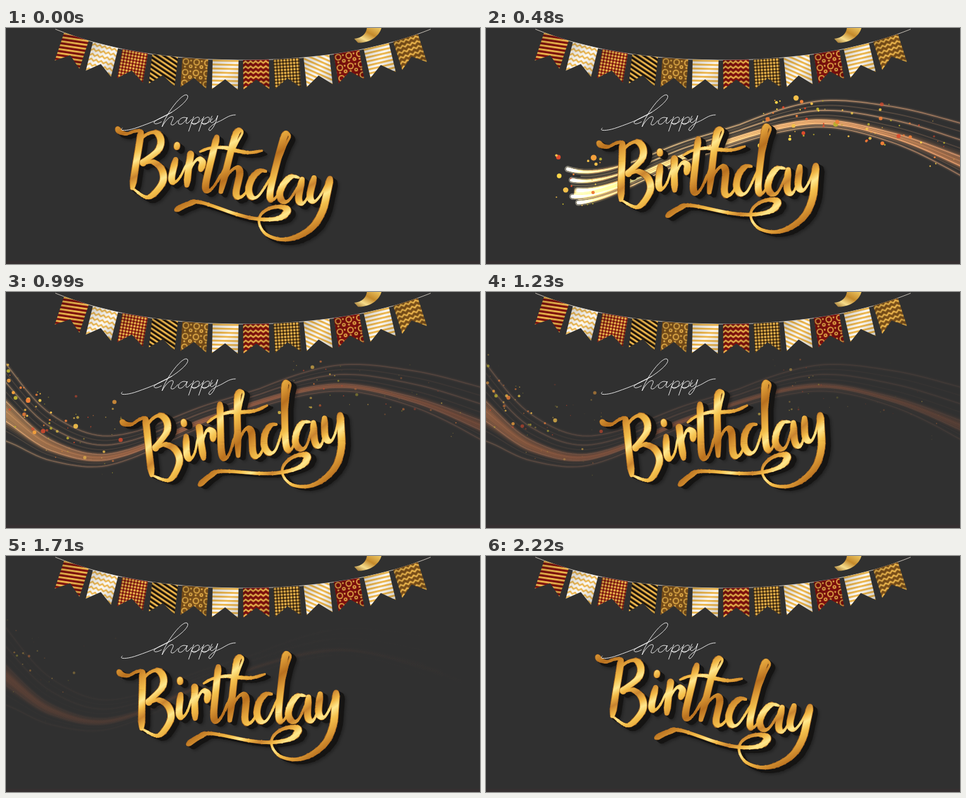
An HTML page with a canvas that plays this animation: 750x375 px, repeating every 2.25 s.

```html
<!DOCTYPE html>
<html lang="en">
<head>
<meta charset="utf-8">
<title>Happy Birthday</title>
<style>
html, body { margin: 0; width: 100%; height: 100%; overflow: hidden; background: #303030; }
canvas, svg { position: absolute; left: 0; top: 0; width: 750px; height: 375px; display: block; }
</style>
</head>
<body>
<canvas id="light" width="750" height="375"></canvas>
<svg viewBox="0 0 750 375">
  <defs id="defs">
    <linearGradient id="gold" gradientUnits="userSpaceOnUse" x1="200" y1="160" x2="232" y2="222" spreadMethod="reflect">
      <stop offset="0" stop-color="#b8701f"/><stop offset=".25" stop-color="#dc9a36"/>
      <stop offset=".5" stop-color="#f4c04c"/><stop offset=".68" stop-color="#ffe88e"/>
      <stop offset=".82" stop-color="#f2b846"/><stop offset="1" stop-color="#c98430"/>
    </linearGradient>
    <linearGradient id="curl" x1="0" y1="1" x2="1" y2="0">
      <stop offset="0" stop-color="#8d5f1c"/><stop offset=".3" stop-color="#f7dd8c"/>
      <stop offset=".6" stop-color="#c48a2c"/><stop offset="1" stop-color="#f0c963"/>
    </linearGradient>
    <linearGradient id="sheen" x1="0" y1="0" x2="1" y2="1">
      <stop offset="0" stop-color="#000" stop-opacity=".18"/><stop offset=".5" stop-color="#000" stop-opacity="0"/>
      <stop offset="1" stop-color="#000" stop-opacity=".18"/>
    </linearGradient>
    <filter id="soft" x="-10%" y="-10%" width="120%" height="120%"><feGaussianBlur stdDeviation="2"/></filter>
  </defs>
  <rect y="370" width="750" height="5" fill="#352f30"/>
  <path id="string" fill="none" stroke="#c9c3ba"/>
  <g id="flags"></g>
  <path d="M571 0H594C591 12 577 24 557 23.5L551 17C563 16 570 9 571 0Z" fill="url(#curl)"/>
  <g id="word"></g>
  <g fill="none" stroke="#fff" stroke-width=".9" stroke-linecap="round">
    <path d="M184 159C177 164 192 164 208 158C228 151 248 143 262 134C276 125 291 112 287 107C282 102 266 121 258 134C252 144 248 152 247 157C252 147 260 139 264 141C267 144 258 153 262 154C266 155 269 150 272 147"/>
    <path d="M262 134C249 141 238 145 234 150C235 154 241 152 246 149"/>
    <path d="M286 143C279 139 271 147 273 152C277 156 284 148 287 142C284 150 284 153 288 151L294 145"/>
    <path id="p" d="M297 141L289 164M293 151C298 141 307 139 306 145C304 152 297 156 294 151C301 154 307 149 311 144"/>
    <use href="#p" x="16"/>
    <path d="M326 140C322 147 323 152 327 150C331 148 334 143 335 139C333 148 329 159 323 163C317 163 324 154 336 149C346 145 352 138 363 138"/>
  </g>
</svg>
<script>
const $ = id => document.getElementById(id);
const clamp = (v, a = 0, b = 1) => Math.min(b, Math.max(a, v));

// Flags hang along one sagging curve
const GOLD = '#edb64c', RED = '#7d0f0d', WHITE = '#fbf8f2', BRONZE = '#7a4f1a';
const sag = x => 51 - .00043 * (x - 375) ** 2 - 1.45e-9 * (x - 375) ** 4;
const tilt = x => Math.atan(sag(x + .5) - sag(x - .5));

const motifs = {
  bars: c => [6.4, `<rect width="7" height="3" fill="${c}"/>`],
  zigzag: c => [8, `<path d="M-1 6L4 2L9 6" fill="none" stroke="${c}" stroke-width="2.4"/>`],
  dots: c => [5, `<circle cx="2.5" cy="2.5" r="1.9" fill="${c}"/>`],
  rings: c => [17, `<g fill="none" stroke="${c}" stroke-width="1.7"><circle cx="6" cy="6" r="4.3"/><circle cx="14" cy="13" r="2"/></g>
    <circle cx="14" cy="4" r="1.4" fill="${c}"/><circle cx="5" cy="14" r="1.6" fill="${c}"/>`]
};
const flags = [
  ['bars', RED, -10], ['zigzag', WHITE], ['dots', RED], ['bars', '#1f150b', 27],
  ['rings', BRONZE], ['bars', WHITE], ['zigzag', RED], ['dots', '#3a260f'],
  ['bars', WHITE, 30], ['rings', RED], ['bars', WHITE], ['zigzag', BRONZE]
];
let hang = 92;
flags.forEach(([motif, ground, turn = 0], i) => {
  const [size, art] = motifs[motif](GOLD);
  $('defs').insertAdjacentHTML('beforeend',
    `<pattern id="cloth${i}" width="${size}" height="${size}" patternUnits="userSpaceOnUse" patternTransform="rotate(${turn})">` +
    `<rect width="${size}" height="${size}" fill="${ground}"/>${art}</pattern>`);
  const a = tilt(hang + 20), d = 'M0 0H41V47L20.5 31L0 47Z';
  $('flags').insertAdjacentHTML('beforeend',
    `<g transform="translate(${hang} ${sag(hang)}) rotate(${a * 180 / Math.PI})">` +
    `<path d="${d}" fill="url(#cloth${i})"/><path d="${d}" fill="url(#sheen)"/></g>`);
  hang += 48 * Math.cos(a);
});
let cord = '';
for (let x = 78; x <= 672; x += 6) cord += `${cord ? 'L' : 'M'}${x} ${sag(x).toFixed(1)}`;
$('string').setAttribute('d', cord);

// Lettering: a pen that presses on downstrokes and lifts on upstrokes
const num = v => v.toFixed(1);
function segment(a, b, k) {
  const dx = b.x - a.x, dy = b.y - a.y, len = Math.hypot(dx, dy) || 1;
  const nx = -dy / len, ny = dx / len, p = a.w * k / 2, q = b.w * k / 2;
  const at = (c, s) => `${num(c.x + nx * s)} ${num(c.y + ny * s)}`;
  return `M${at(a, p)}L${at(b, q)}L${at(b, -q)}L${at(a, -p)}Z` +
    `M${num(b.x - q)} ${num(b.y)}a${num(q)} ${num(q)} 0 1 0 ${num(2 * q)} 0a${num(q)} ${num(q)} 0 1 0 ${num(-2 * q)} 0Z`;
}
let full = '', face = '';
function brush(text, weight = 1) {
  const pts = text.split(', ').map(s => s.split(' ').map(Number)), n = pts.length - 1;
  const pt = i => pts[clamp(i, 0, n)];
  const curve = s => {
    const i = Math.min(n - 1, Math.floor(s)), u = s - i;
    return [0, 1].map(j => {
      const a = pt(i - 1)[j], b = pt(i)[j], c = pt(i + 1)[j], d = pt(i + 2)[j];
      return b + u / 2 * (c - a + u * (2 * a - 5 * b + 4 * c - d + u * (3 * (b - c) + d - a)));
    });
  };
  let last;
  for (let s = 0; s <= n; s += 1 / 8) {
    const [x, y] = curve(s), [x0, y0] = curve(Math.max(0, s - .15)), [x1, y1] = curve(Math.min(n, s + .15));
    const fall = (y1 - y0) / (Math.hypot(x1 - x0, y1 - y0) || 1);
    const taper = Math.min(1, .65 + s, .65 + n - s);
    const next = { x, y, w: (5.8 + fall * (fall > 0 ? 6 : 2)) * weight * taper };
    if (last) {
      full += segment(last, next, 1);
      face += segment(last, next, .86);
    }
    last = next;
  }
}
// B
brush('176 160, 181 165, 191 168, 203 164, 214 163', .9);
brush('214 164, 210 190, 205 220, 200 254');
brush('206 186, 221 170, 237 166, 245 178, 240 195, 217 214, 233 213, 247 226, 247 247, 225 269, 202 256', 1.05);
// i
brush('271 185, 270 190', .9);
brush('269 207, 262 238, 267 245, 276 236, 285 217');
// r
brush('285 217, 292 200, 289 222, 286 250');
brush('287 238, 295 218, 304 208, 311 213, 308 225');
// t
brush('334 172, 327 200, 316 248, 320 259, 330 250, 340 232');
brush('306 197, 322 191, 345 190, 365 195, 385 198, 405 195', .9);
// h
brush('335 245, 352 210, 366 182, 374 166, 368 163, 360 180, 340 260');
brush('342 252, 352 232, 364 222, 370 230, 364 262, 370 269, 379 262, 388 245');
// d
brush('412 228, 402 227, 390 238, 384 256, 389 269, 401 265, 422 232');
brush('418 240, 432 212, 442 187, 449 172, 443 168, 436 186, 418 260, 424 272, 440 250');
// a
brush('464 238, 452 236, 440 247, 433 264, 439 276, 450 271, 469 240');
brush('469 238, 463 270, 469 279, 478 268, 485 250');
// y and its flourish
brush('488 236, 481 266, 487 276, 498 265, 512 238');
brush('513 238, 508 262, 501 290, 486 315, 462 331, 436 336, 412 328, 401 312, 403 297, 416 287, 433 284, 445 289, 437 300, 420 304, 395 303, 365 296, 308 277, 288 280, 269 289', 1.1);

const depth = [2, 4, 6, 7].map(o => `<path d="${full}" transform="translate(${o} ${o * .8})"/>`).join('');
$('word').innerHTML =
  `<path d="${full}" transform="translate(9 8)" fill="#000" opacity=".3" filter="url(#soft)"/>` +
  `<g fill="#151413">${depth}</g><path d="${full}" fill="#a8661f"/><path d="${face}" fill="url(#gold)"/>`;

// Light trail
const ctx = $('light').getContext('2d');
function spline(...keys) {
  const slope = i => {
    const a = keys[Math.max(0, i - 1)], b = keys[Math.min(keys.length - 1, i + 1)];
    return (b[1] - a[1]) / (b[0] - a[0]);
  };
  return x => {
    let i = 0;
    while (i < keys.length - 2 && x > keys[i + 1][0]) i++;
    const [x0, y0] = keys[i], [x1, y1] = keys[i + 1], h = x1 - x0, u = clamp((x - x0) / h), w = 1 - u;
    return w * w * (1 + 2 * u) * y0 + u * u * (3 - 2 * u) * y1 + h * u * w * (w * slope(i) - u * slope(i + 1));
  };
}
const mid = spline([-40, 126], [0, 174], [70, 235], [165, 257], [330, 195], [510, 147], [640, 166], [780, 215]);
const above = x => 16 + 44 * Math.exp(-x / 130) + 40 * clamp((x - 400) / 380);
const below = x => 11 + 52 * Math.exp(-x / 80) + 25 * clamp((x - 550) / 230) ** 2;
const lane = (x, k) => mid(x) + k * (k < 0 ? above(x) : below(x));
// The head slows down on its way left; arrive() is the inverse
const head = t => t < 860 ? 750 - 1.9 * t + .0011 * t * t : -120;
const arrive = x => (1.9 - Math.sqrt(Math.max(0, 3.61 - .0044 * (750 - x)))) / .0022;

let seed = 7;
const rnd = () => (seed = (seed * 16807) % 2147483647) / 2147483647;
const between = (a, b) => a + (b - a) * rnd();
const mix = (a, b, u) => a.map((v, i) => Math.round(v + (b[i] - v) * u));

function glow(t, power) {
  const g = ctx.createLinearGradient(-40, 0, 770, 0);
  for (let i = 0; i <= 27; i++) {
    const x = -40 + i * 30, age = Math.max(0, t - arrive(x) - 20);
    const heat = Math.exp(-((age / (360 + 70 * clamp((260 - x) / 200))) ** 1.6));
    const fade = clamp(1 - age / 1700) ** 1.3 * clamp((2150 - t) / 500);
    g.addColorStop(i / 27, `rgba(${mix([172, 94, 62], [255, 218, 130], heat)},${(fade * power).toFixed(3)})`);
  }
  return g;
}
function run(k, from, to) {
  const step = from < to ? 8 : -8;
  for (let x = from; (to - x) * step > 0; x += step) ctx.lineTo(x, lane(x, k));
  ctx.lineTo(to, lane(to, k));
}
function ball(x, y, r, color, alpha) {
  ctx.globalAlpha = clamp(alpha);
  ctx.fillStyle = color;
  ctx.beginPath();
  ctx.arc(x, y, r, 0, 7);
  ctx.fill();
  ctx.globalAlpha = 1;
}

const strands = [];
for (let i = 0; i < 9; i++) {
  const bold = i % 2 === 0;
  strands.push({ k: -1 + i / 4, lag: between(38, 60), bold, width: bold ? 2 : 1, power: bold ? .65 : .3 });
}
const tints = ['#ffd84a', '#f2a03c', '#ef7f38', '#dd4a2c', '#b9ad30', '#f3c04a'];
const sparks = [];
for (let i = 0; i < 150; i++) {
  const right = i % 2;
  sparks.push({
    x: right ? between(430, 745) : between(-4, 185),
    off: right ? between(-42, 26) : between(-50, 30),
    vx: between(-.012, .004), vy: right ? between(-.015, .03) : between(-.08, .02),
    r: 1 + 4 * rnd() ** 2.2, wait: between(-15, 110), life: between(700, 1600),
    tint: tints[Math.floor(rnd() * tints.length)]
  });
}

function comet(s, t) {
  const x = head(t) + s.lag;
  if (head(t) < -50 || x > 750) return;
  const g = ctx.createLinearGradient(x, 0, x + 95, 0);
  g.addColorStop(0, 'rgba(255,246,215,.95)');
  g.addColorStop(.25, 'rgba(255,205,110,.6)');
  g.addColorStop(1, 'rgba(255,140,60,0)');
  ctx.strokeStyle = g;
  ctx.lineCap = 'round';
  [10, 5].forEach((w, i) => {
    ctx.globalAlpha = .35 + .65 * i;
    ctx.lineWidth = w;
    ctx.beginPath();
    run(s.k, x, x + 95);
    ctx.stroke();
  });
  ctx.globalAlpha = 1;
}

function drawLight(t) {
  ctx.globalCompositeOperation = 'source-over';
  ctx.fillStyle = '#303030';
  ctx.fillRect(0, 0, 750, 375);
  if (t < 30) return;

  // Main band: nested layers give a soft edge
  const front = Math.max(-40, head(t) + 48), slim = 1 - .4 * t / 2250;
  for (let i = 0; i < 6; i++) {
    const half = (.5 - i * .07) * slim;
    ctx.fillStyle = glow(t, .14 + .05 * i);
    ctx.beginPath();
    run(.28 - half, front, 771);
    run(.28 + half, 771, front);
    ctx.fill();
  }
  ctx.globalCompositeOperation = 'lighter';
  const dim = clamp(1.25 - t / 1700, .1, 1);
  strands.forEach(s => {
    ctx.lineCap = 'butt';
    [[1, 1], [3, .25]].forEach(([w, p]) => {
      ctx.strokeStyle = glow(t, s.power * p * dim);
      ctx.lineWidth = s.width * w;
      ctx.beginPath();
      run(s.k, Math.max(-40, head(t) + s.lag), 771);
      ctx.stroke();
    });
    if (s.bold) comet(s, t);
  });
  ctx.globalCompositeOperation = 'source-over';
  sparks.forEach(p => {
    const age = t - arrive(p.x) - p.wait, left = 1 - age / p.life;
    if (age < 0 || left <= 0) return;
    ball(p.x + p.vx * age, mid(p.x) + p.off + p.vy * age, p.r * (.25 + .75 * left), p.tint, 1.3 * left);
  });
}

const start = performance.now();
function frame() {
  const now = Math.max(0, performance.now() - start) % 2250;
  const t = Math.floor(now / 30) * 30;
  const sway = clamp(1 - Math.abs(t - 1110) / 1110);
  $('word').setAttribute('transform', `rotate(${(-16.9 * sway).toFixed(3)} 353.6 156.7)`);
  drawLight(t);
  requestAnimationFrame(frame);
}
frame();
</script>
</body>
</html>
```
